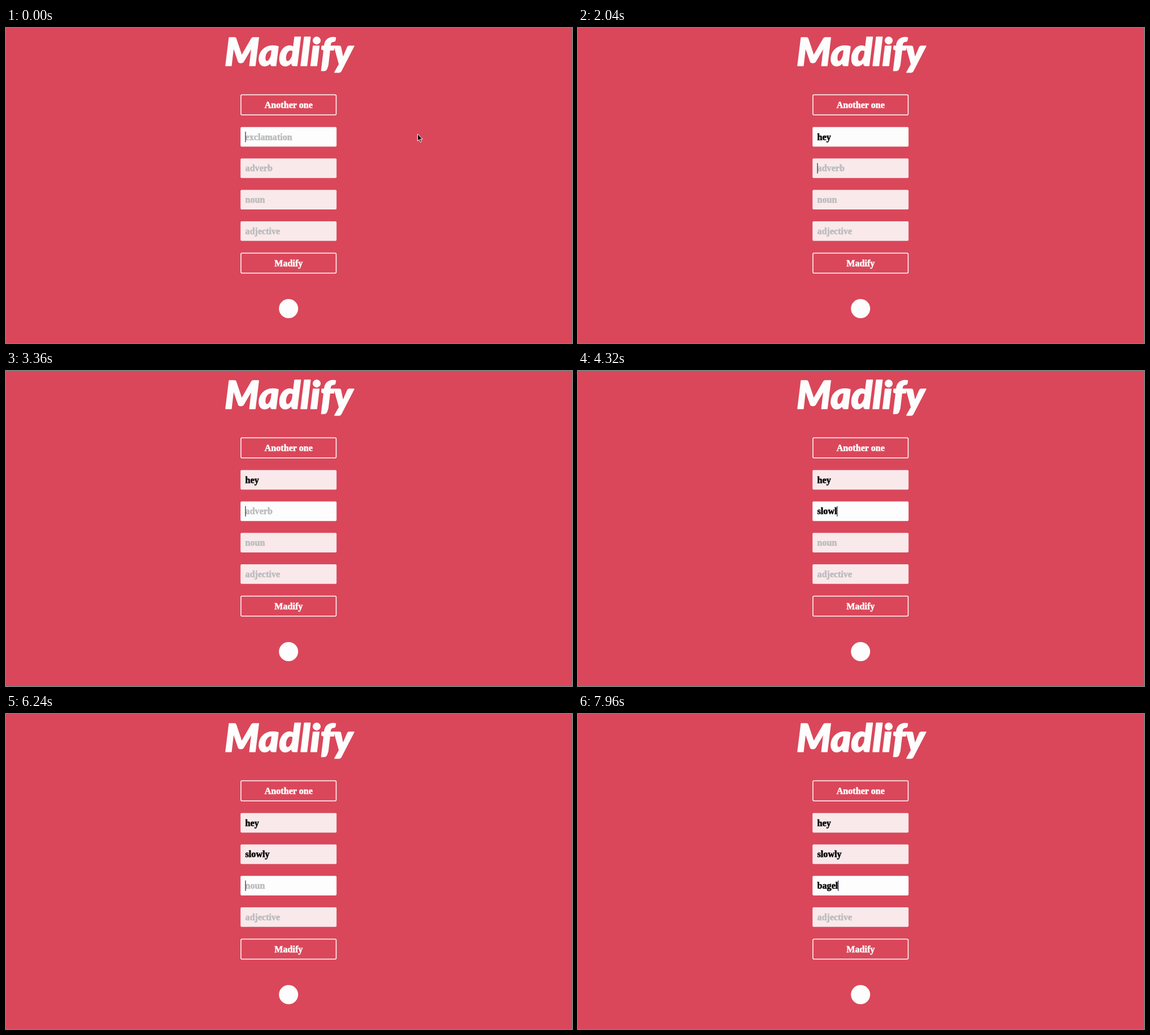
An HTML page that plays this animation: 1002x559 px, repeating every 8 s.

```html
<!DOCTYPE html>
<html lang="en">
<head>
<meta charset="utf-8">
<title>Madlify</title>
<style>
html, body { margin: 0; width: 100%; height: 100%; overflow: hidden; background: #da475a; }
svg { display: block; width: 1002px; height: 559px; }
text { font: bold 16.1px "Liberation Serif", "Times New Roman", serif; stroke-width: .6px; }
.title { font: italic 900 68.5px Lato, sans-serif; fill: #fdfdfd; stroke: #fdfdfd; stroke-width: 1.5px; stroke-linejoin: round; }
.button rect { fill: none; stroke: #fdfdfd; stroke-width: 1.5; }
.button text { fill: #fdfdfd; stroke: #fdfdfd; text-anchor: middle; }
.field rect { fill: #fdfdfd; }
</style>
</head>
<body>
<svg id="stage" viewBox="0 0 1002 559">
  <text class="title" x="387" y="67">Madlify</text>
  <circle cx="500.2" cy="498" r="17" fill="#fdfdfd"/>
  <path id="pointer" d="M728.5 188v12.6l2.9-2.7 2 4.7 2.2-.9-2-4.6h4z" fill="#111" stroke="#fff" stroke-width="1"/>
</svg>
<script>
const LOOP = 8000, FADE = 300, BLINK = 500, LEFT = 423.6;
const stage = document.getElementById('stage');
const pointer = document.getElementById('pointer');

// focus: when the field gets focus; keys: when each letter of word is typed
const fields = [
  { hint: 'exclamation', word: 'hey', focus: -1300, keys: [1240, 1400, 1560] },
  { hint: 'adverb', word: 'slowly', focus: 2000, keys: [3560, 3720, 3880, 4040, 4200, 4360] },
  { hint: 'noun', word: 'bagel', focus: 4760, keys: [6960, 7120, 7280, 7440, 7600] },
  { hint: 'adjective', word: '', focus: Infinity, keys: [] }
];

function add(parent, tag, attrs) {
  const el = document.createElementNS('http://www.w3.org/2000/svg', tag);
  for (const name in attrs) el.setAttribute(name, attrs[name]);
  return parent.appendChild(el);
}

function addButton(y, label) {
  const g = add(stage, 'g', { class: 'button' });
  add(g, 'rect', { x: 415.9, y, width: 168.6, height: 35.7, rx: 2 });
  add(g, 'text', { x: 500.3, y: y + 23.8 }).textContent = label;
}

addButton(118.5, 'Another one');
addButton(399.4, 'Madify');

fields.forEach((f, i) => {
  const y = 175.8 + i * 55.75;
  const g = add(stage, 'g', { class: 'field' });
  f.y = y;
  f.box = add(g, 'rect', { x: 415.2, y, width: 170, height: 34.8, rx: 2 });
  f.text = add(g, 'text', { x: LEFT, y: y + 22.9 });
});
const caret = add(stage, 'rect', { width: 1.2, height: 18.5, fill: '#222a3a' });

function ease(p) {
  p = Math.max(0, Math.min(1, p));
  return p * p * (3 - 2 * p);
}

function draw(t) {
  let active = 0;
  fields.forEach((f, i) => {
    const next = fields[i + 1];
    const blur = next ? next.focus : Infinity;
    const lit = ease((t - f.focus) / FADE) - ease((t - blur) / FADE);
    const typed = f.keys.filter(k => k <= t).length;
    const color = typed ? '#080808' : '#bbbcbd';
    f.box.setAttribute('fill-opacity', 0.89 + 0.11 * lit);
    f.text.textContent = typed ? f.word.slice(0, typed) : f.hint;
    f.text.setAttribute('fill', color);
    f.text.setAttribute('stroke', color);
    f.typed = typed;
    if (t >= f.focus) active = i;
  });

  const f = fields[active];
  const since = t - (f.typed ? f.keys[f.typed - 1] : f.focus);
  const end = f.typed ? f.text.getComputedTextLength() : 0;
  caret.setAttribute('x', LEFT - 0.2 + end);
  caret.setAttribute('y', f.y + 8.2);
  caret.setAttribute('visibility', since % (2 * BLINK) < BLINK ? 'visible' : 'hidden');
  pointer.setAttribute('visibility', t < fields[0].keys[0] ? 'visible' : 'hidden');
}

const start = performance.now();
function tick() {
  draw((performance.now() - start) % LOOP);
  requestAnimationFrame(tick);
}
tick();
</script>
</body>
</html>
```
